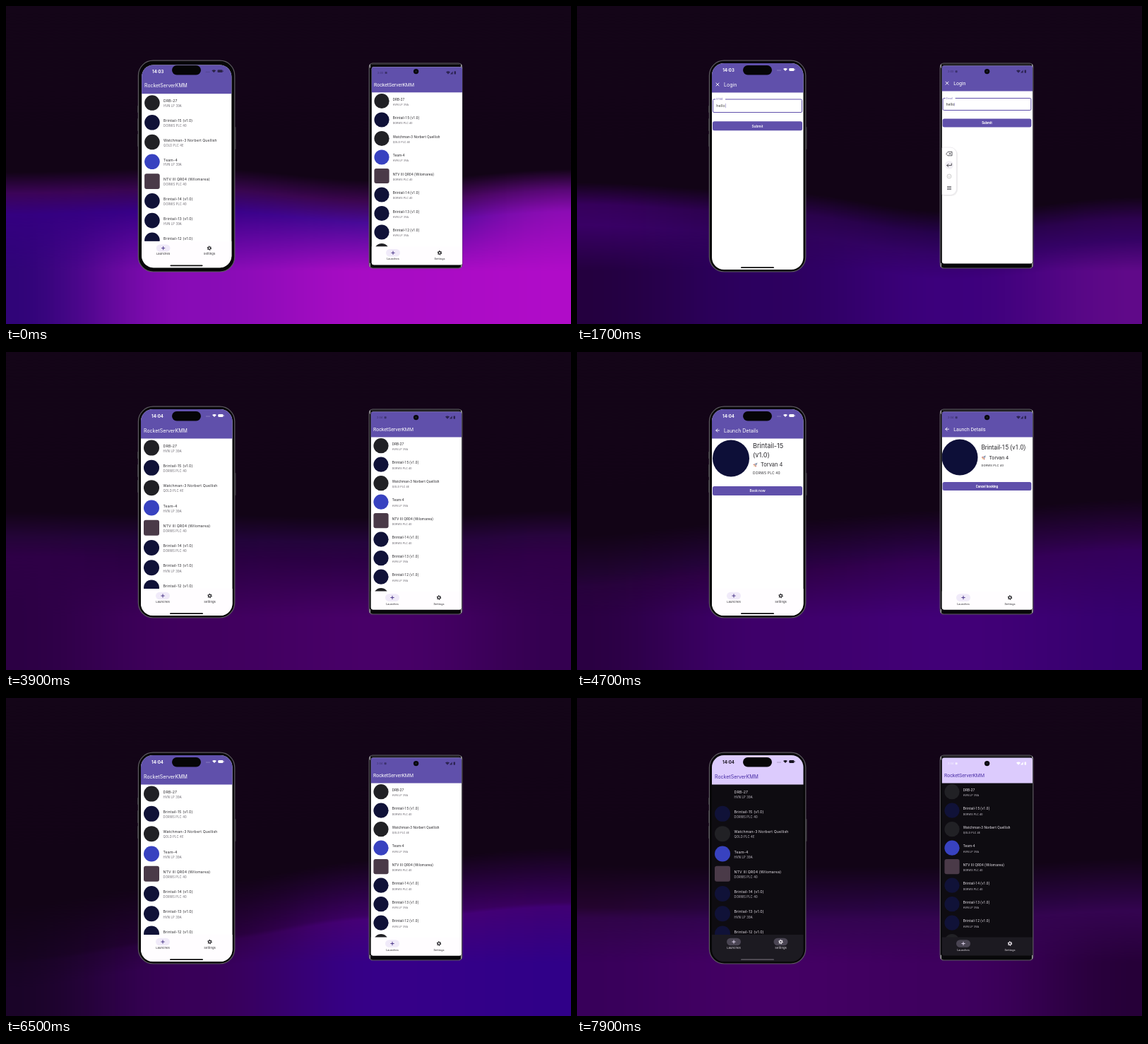
An HTML page with a canvas that plays this animation: 800x450 px, repeating every 8 s.

```html
<!DOCTYPE html>
<html lang="en">
<head>
<meta charset="utf-8">
<title>Launch app on two phones</title>
<style>
  html, body { margin: 0; width: 100%; height: 100%; overflow: hidden; background: #130417; }
  canvas, svg { position: absolute; left: 0; top: 0; width: 800px; height: 450px; }
</style>
</head>
<body>
<canvas id="sky" width="200" height="450"></canvas>
<svg id="stage" viewBox="0 0 800 450" xmlns="http://www.w3.org/2000/svg"></svg>
<script>
const LOOP = 8000, STEP = 100;
const clamp = v => Math.max(0, Math.min(1, v));
const ramp = (t, start, length) => clamp((t - start) / length);
const mix = (a, b, k) => a + (b - a) * k;

/* ---------- backdrop: a soft horizon with three colour bands below it ---------- */
const hex = s => [0, 2, 4].map(i => parseInt(s.slice(i, i + 2), 16));
const glow = (time, soft, horizon, ...bands) =>
  ({ time, soft, horizon, bands: bands.map(b => b.split(' ').map(hex)) });
const glows = [
  glow(0, 30, [250, 244, 262, 246], '3c0458 380650 3c0650 5a0878', '340080 380088 480a98 8c0cb4', '300478 880cb6 a80cc4 b00cc8'),
  glow(900, 16, [263, 268, 302, 290], '440078 3a0070 300068 340060', '440080 3c0080 40008c 3a0080', '200040 300078 4000a0 7a10b0'),
  glow(2700, 50, [268, 288, 312, 280], '240038 180420 1a0428 240438', '2c0044 1e042a 240438 2c0440', '28003e 280040 380050 400058'),
  glow(3900, 36, [244, 248, 252, 242], '240438 22043a 24043c 28043e', '2e0046 2a0042 2c0045 300048', '2c0044 40005e 480068 340050'),
  glow(5600, 78, [335, 285, 250, 228], '1c0428 280040 300050 300050', '200430 34004c 3c0064 380070', '280040 3c0078 3a0088 380090'),
  glow(6500, 78, [330, 300, 268, 250], '160420 260038 3c0064 38005c', '180424 2e0046 460078 400074', '1a0428 380058 360088 300088'),
  glow(7900, 60, [266, 268, 268, 256], '24042e 280440 2a0444 2c0444', '300448 320450 340450 340450', '38005a 440064 3e005e 260038')
];
const sky = document.getElementById('sky').getContext('2d');
const blend = (a, b, k) => a.map((v, i) => mix(v, b[i], k));
const rgb = c => `rgb(${c.map(Math.round)})`;

function drawSky(t) {
  let n = 0;
  while (n < glows.length - 2 && t >= glows[n + 1].time) n++;
  const a = glows[n], b = glows[n + 1];
  const k = ramp(t, a.time, b.time - a.time);
  const soft = mix(a.soft, b.soft, k) / 2;
  const horizon = blend(a.horizon, b.horizon, k);
  const bands = a.bands.map((band, j) => band.map((c, i) => blend(c, b.bands[j][i], k)));
  for (let x = 0; x < 200; x++) {
    const u = x / 199 * 3, i = Math.min(2, Math.floor(u));
    const f = (1 - Math.cos((u - i) * Math.PI)) / 2;
    const y = mix(horizon[i], horizon[i + 1], f);
    const g = sky.createLinearGradient(0, 0, 0, 450);
    g.addColorStop(0, '#140518');
    g.addColorStop((y - soft) / 450, '#120416');
    [y + soft, y + 45, Math.max(y + 80, 375)].forEach((stop, j) =>
      g.addColorStop(stop / 450, rgb(blend(bands[j][i], bands[j][i + 1], f))));
    sky.fillStyle = g;
    sky.fillRect(x, 0, 1, 450);
  }
}

/* ---------- drawing helpers ---------- */
const rect = (x, y, w, h, r, fill, more = '') =>
  `<rect x="${x}" y="${y}" width="${w}" height="${h}" rx="${r}" fill="${fill}" ${more}/>`;
const circle = (x, y, r, fill) => `<circle cx="${x}" cy="${y}" r="${r}" fill="${fill}"/>`;
const line = (d, color, w = 1) =>
  `<path d="${d}" fill="none" stroke="${color}" stroke-width="${w}" stroke-linecap="round" stroke-linejoin="round"/>`;
const text = (x, y, s, size, fill, more = '') =>
  `<text x="${x}" y="${y}" font-size="${size}" fill="${fill}" ${more}>${s}</text>`;
const group = (body, more) => `<g ${more}>${body}</g>`;
const at = (x, y, body) => group(body, `transform="translate(${x} ${y})"`);
const centered = 'text-anchor="middle"';

const gear = color => `<circle r="1.8" fill="none" stroke="${color}" stroke-width="1.3"/>` +
  `<circle r="2.7" fill="none" stroke="${color}" stroke-width="1.1" stroke-dasharray="1.4 1.427"/>`;
const plus = color => line('M-2.2 0H2.2M0-2.2V2.2', color, 0.9);
const rocket = s => group(
  '<path d="M0-4Q2-2 1.5 2H-1.5Q-2-2 0-4Z" fill="#b9bcc4"/><path d="M-1.5 0L-3 3L-1 2ZM1.5 0L3 3L1 2Z" fill="#c4473c"/>' +
  circle(0, -1, 0.7, '#3d6ea8') + '<path d="M-.8 2L0 4.2L.8 2Z" fill="#f0a030"/>',
  `transform="rotate(45) scale(${s})"`);

/* ---------- content ---------- */
const LIGHT = { bar: '#6050ab', onBar: '#fff', page: '#fff', nav: '#fffdff', ink: '#2b2a2e', faint: '#66636b', chip: '#f0eaf9', accent: '#3f2b80' };
const DARK = { bar: '#dccbfd', onBar: '#4a2fa6', page: '#0e0c11', nav: '#1c1a21', ink: '#e8e3ea', faint: '#cac5cf', chip: '#4a4553', accent: '#e8def8' };
const GREY = '#212125', NAVY = '#101238';
const PADS = ['HVN LP 39A', 'DORWS PLC 40', 'QOLD PLC 4E'];
const launches = [
  ['DRB-27', 0, GREY], ['Brintail-15 (v1.0)', 1, NAVY], ['Watchman-3 Norbert Quellish', 2, GREY],
  ['Team-4', 0, '#3842c0'], ['NTV III QR04 (Wilomarea)', 1, '#4a3a48'], ['Brintail-14 (v1.0)', 1, NAVY],
  ['Brintail-13 (v1.0)', 0, NAVY], ['Brintail-12 (v1.0)', 0, NAVY], ['Brintail-11 (v1.0)', 0, GREY]
];
const EMAIL = 'hello@mail.test';

const phones = [
  {
    id: 'a', font: 'Inter, sans-serif', x: 191, w: 129.5, top: 81, bottom: 373, round: 17, bar: 122.5,
    titleX: 195, titleY: 113.6, size: 7, navY: 345, navTop: 335, tabs: [222, 288.5],
    list: { icon: 206, text: 222.5, y: 135.6, step: 28.27, r: 11, size: 5.2, sub: 4.2 },
    btnX: 192, btnW: 127, btnH: 13, settingsY: 123.5, loginY: 163.3, bookY: 190,
    fieldY: 132, fieldH: 18.5, mark: 199, subTitleX: 208,
    detail: { cx: 218, cy: 150.5, x: 249, lines: ['Brintail-15', '(v1.0)'], y: 135.6, size: 9.2, rocketY: 159.2, name: 7.5, padY: 173.2, pad: 4.9 },
    snackY: 304, snackH: 16, green: 2500,
    messages: [[5200, 6200, 'Trip booked!']],
    booked: t => t >= 5100, spinBook: t => t >= 4800 && t < 5100
  },
  {
    id: 'b', font: 'Roboto, sans-serif', x: 516.8, w: 128.2, top: 84.4, bottom: 364.4, round: 3, bar: 120.5,
    titleX: 520, titleY: 111.8, size: 6.9, navY: 347.5, navTop: 338.5, tabs: [547, 613],
    list: { icon: 531, text: 546.7, y: 132.7, step: 26.5, r: 10.6, size: 4.8, sub: 3.8 },
    btnX: 517.6, btnW: 125.8, btnH: 12, settingsY: 122.2, loginY: 159.6, bookY: 184,
    fieldY: 130.5, fieldH: 17, mark: 524, subTitleX: 533.3,
    detail: { cx: 542, cy: 149, x: 572.4, lines: ['Brintail-15 (v1.0)'], y: 138.4, size: 8.6, rocketY: 149, name: 7.2, padY: 161.5, pad: 4.3 },
    snackY: 312, snackH: 15, green: 2900,
    messages: [[4800, 5400, 'Trip booked!'], [5500, 6200, 'Trip cancelled']],
    booked: t => t >= 4700 && t < 5400, spinBook: t => t >= 5200 && t < 5400
  }
];

const scenes = [
  [-900, 'list', LIGHT], [600, 'settings', LIGHT], [1200, 'login', LIGHT], [3100, 'settings', LIGHT],
  [3500, 'list', LIGHT], [4200, 'details', LIGHT], [6100, 'list', LIGHT], [7200, 'list', DARK]
];

/* ---------- screens ---------- */
function button(p, y, label, t, fill = LIGHT.bar) {
  const cx = p.btnX + p.btnW / 2, cy = y + p.btnH / 2;
  const mark = label === 'spin'
    ? at(cx, cy, group(line('M0-3.6A3.6 3.6 0 0 1 0 3.6', '#fff', 0.8), `transform="rotate(${t * 0.36 + 128})"`))
    : label === 'check' ? at(cx, cy, line('M-2 0L-.5 1.6L2.2-1.6', '#fff', 1))
    : text(cx, cy + 1.7, label, p.id === 'a' ? 4.7 : 4.5, '#fff', centered + ' font-weight="600"');
  return rect(p.btnX, y, p.btnW, p.btnH, 2.5, fill) + mark;
}

function header(p, c, title, mark) {
  const y = p.titleY - 2.6;
  const icon = mark === 'close' ? 'M-2-2L2 2M2-2L-2 2' : 'M2.4 0H-2.2M0-2.2L-2.2 0L0 2.2';
  return rect(p.x - 5, p.top - 6, p.w + 10, p.bar - p.top + 6, 0, c.bar) +
    (mark ? at(p.mark, y, line(icon, c.onBar, 0.9)) : '') +
    text(mark ? p.subTitleX : p.titleX, p.titleY, title, p.size, c.onBar);
}

function nav(p, c, active, t) {
  const chip = i => rect(p.tabs[i] - 10, p.navY - 5.3, 20, 10.6, 5.3, c.chip);
  const leaving = p.id === 'a' && t >= 7700;
  return rect(p.x - 5, p.navTop, p.w + 10, 60, 0, c.nav) + chip(active) + (leaving ? chip(1) : '') +
    at(p.tabs[0], p.navY, plus(active ? c.faint : c.accent)) + at(p.tabs[1], p.navY, gear(c.ink)) +
    ['Launches', 'Settings'].map((s, i) =>
      text(p.tabs[i], p.navY + 10, s, p.id === 'a' ? 4.1 : 3.9, c.ink, centered + ' letter-spacing=".12"')).join('');
}

const screens = {
  list(p, c, t) {
    const l = p.list;
    const rows = launches.map(([name, pad, color], i) => {
      const y = l.y + i * l.step;
      const loading = p.id === 'a' && i === 0 && t >= 7700;
      const badge = i === 4 ? rect(l.icon - l.r, y - l.r, l.r * 2, l.r * 2, 3, color) : circle(l.icon, y, l.r, color);
      return (loading ? '' : badge) +
        text(l.text, y - 0.8, name, l.size, c.ink, 'letter-spacing=".15"') +
        text(l.text, y + 6.3, PADS[pad], l.sub, c.faint, 'letter-spacing=".16"');
    }).join('');
    return rows + header(p, c, 'RocketServerKMM') + nav(p, c, 0, t);
  },

  settings(p, c, t) {
    return header(p, c, 'RocketServerKMM') +
      button(p, p.settingsY, t < 3000 ? 'Login' : 'Logout', t) + nav(p, c, 1, t);
  },

  login(p, c, t) {
    const x = p.btnX + 0.5, size = p.id === 'a' ? 5.2 : 5;
    const typed = EMAIL.slice(0, Math.floor(ramp(t, 1400, 800) * EMAIL.length));
    const base = p.fieldY + p.fieldH / 2 + 1.8;
    const state = t < 2300 ? 'Submit' : t < p.green ? 'spin' : 'check';
    const field = rect(x, p.fieldY, p.btnW - 1, p.fieldH, 1.5, '#fff', `stroke="${c.bar}" stroke-width="1"`) +
      rect(x + 3.5, p.fieldY - 1, 14, 2, 0, '#fff') +
      text(x + 4.7, p.fieldY + 1.2, 'Email', 3.7, '#7d70bb') +
      `<text x="${x + 4.7}" y="${base}" font-size="${size}" letter-spacing=".15" fill="#333">${typed}<tspan fill="#5040a8" dx="-.2">|</tspan></text>`;
    return header(p, c, 'Login', 'close') + field +
      button(p, p.loginY, state, t, state === 'check' ? '#8fd098' : c.bar) +
      (p.id === 'b' ? keyTools(ramp(t, 1300, 200)) : '');
  },

  details(p, c, t) {
    const d = p.detail;
    const label = p.spinBook(t) ? 'spin' : p.booked(t) ? 'Cancel booking' : 'Book now';
    return header(p, c, 'Launch Details', 'back') + circle(d.cx, d.cy, p.id === 'a' ? 26 : 25.5, '#0d0f38') +
      d.lines.map((s, i) => text(d.x, d.y + i * 13.2, s, d.size, c.ink)).join('') +
      at(d.x + 4, d.rocketY, rocket(0.95)) +
      text(d.x + 11, d.rocketY + 2.7, 'Torvan 4', d.name, c.ink) +
      text(d.x, d.padY, PADS[1], d.pad, c.ink, 'letter-spacing=".18"') +
      button(p, p.bookY, label, t) + p.messages.map(m => snackbar(p, t, m)).join('') + nav(p, c, 0, t);
  }
};

function snackbar(p, t, [from, to, message]) {
  const shown = Math.min(ramp(t, from - 100, 200), 1 - ramp(t, to - 100, 100));
  if (!shown) return '';
  const x = p.btnX + 1.8, y = p.snackY;
  const size = p.id === 'a' ? 4.6 : 4.4;
  return group(rect(x, y, p.btnW - 4, p.snackH, 1.5, '#262529') +
    text(x + 5, y + p.snackH / 2 + 1.6, message, size, '#eee', 'letter-spacing=".08"') +
    (message.endsWith('!') ? at(x + 36.5, y + p.snackH / 2, rocket(0.55)) : ''), `opacity="${shown}"`);
}

function keyTools(shown) {
  const ink = '#3c3b42';
  return group(rect(512, 201, 27, 68, 9, '#0001') + rect(511, 200, 26.5, 67.5, 9, '#fff', 'stroke="#e2dfe6" stroke-width=".6"') +
    at(527, 209, line('M-4 0L-1.7-2.8H4V2.8H-1.7ZM0-1.2L2.4 1.2M2.4-1.2L0 1.2', ink, 0.8)) +
    circle(527, 225, 6, '#f2f0f5') + at(527, 225, line('M3.3-2V.6H-3.2M-1.2-1.4L-3.2.6L-1.2 2.6', ink, 0.9)) +
    at(527, 241, '<circle r="3" fill="none" stroke="#bbb" stroke-width=".7"/>' + line('M-1.3.6Q0 2 1.3.6M-1-1V-.8M1-1V-.8', '#bbb', 0.6)) +
    at(527, 257.5, line('M-2.6-2H2.6M-2.6 0H2.6M-2.6 2H2.6', ink, 0.8)), `opacity="${shown}"`);
}

/* ---------- phone bodies and status bars ---------- */
const wifi = (x, y, color) => at(x, y, `<path d="M0 2.1L-3-1Q0-3.2 3-1Z" fill="${color}"/>`);

function body(p) {
  if (p.id === 'a') return [[186, 141, 10], [186, 159, 18], [186, 181, 18], [324, 171, 32]]
    .map(([x, y, h]) => rect(x, y, 1.6, h, 0.8, '#343138')).join('') +
    rect(187.4, 77.2, 136.4, 298.8, 21, '#070708', 'stroke="#5d5a60" stroke-width="1.2"');
  return rect(514.2, 81, 131.6, 290, 5, '#08080a', 'stroke="#5d5a60" stroke-width="1.2"') +
    line('M515.4 87V83.4M644.6 87V83.4M515.4 364V368.6M644.6 364V368.6', '#a5a3a8', 1.2) +
    line('M518 82.4H642', '#47454a', 0.8);
}

function island(p) {
  return p.id === 'a' ? rect(235, 84, 41, 13.4, 6.7, '#050506')
    : circle(580.6, 92.6, 3.7, '#08080b') + circle(580.6, 92.6, 1.2, '#1d2036');
}

function status(p, c, t) {
  if (p.id === 'a') {
    const ink = c === DARK ? '#17121f' : '#fff', right = t < 200 ? '#2b2348' : ink;
    return text(214.5, 92.6, t < 3200 ? '14:03' : '14:04', 6, ink, centered + ' font-weight="700"') +
      [284, 286, 288].map(x => circle(x, 91, 0.45, right)).join('') + wifi(295, 90, right) +
      rect(300.3, 88, 7.2, 3.9, 1.2, right) + rect(307.9, 89.2, 0.7, 1.5, 0.3, right) +
      rect(232, 369.2, 47, 1.9, 0.95, c === DARK ? '#55515a' : '#111');
  }
  const ink = c === DARK ? '#fff' : '#2c2452';
  return text(525, 94.4, t < 3200 ? '2:03' : '2:04', 4.3, ink, 'opacity=".7"') + rect(535.6, 91.2, 3, 3, 0.6, ink, 'opacity=".7"') +
    wifi(625, 92.6, ink) + `<path d="M628 94.6L631.6 90.6V94.6Z" fill="${ink}"/>` + rect(633.6, 90.4, 2.4, 4.3, 0.6, ink);
}

function drawPhone(p, t) {
  let n = scenes.length - 1;
  while (t < scenes[n][0]) n--;
  const paint = ([, name, c]) => rect(p.x - 5, p.top - 5, p.w + 10, 310, 0, c.page) + screens[name](p, c, t);
  const shown = ramp(t, scenes[n][0], 200);
  const layers = (shown < 1 ? paint(scenes[n - 1]) : '') + group(paint(scenes[n]), `opacity="${shown}"`);
  const settle = 1 - ramp(t, 0, 300);
  const shift = p.id === 'a'
    ? `translate(256 215) scale(${1 - 0.018 * settle}) translate(-256 -215)`
    : `translate(${settle} ${1.8 * settle})`;
  const screen = group(layers + status(p, scenes[n][2], t), `clip-path="url(#${p.id})" font-family="${p.font}"`);
  return body(p) +
    `<clipPath id="${p.id}">${rect(p.x, p.top, p.w, p.bottom - p.top, p.round, '#fff')}</clipPath>` +
    group(screen, `transform="${shift}"`) + island(p);
}

const stage = document.getElementById('stage');
const began = performance.now();
let last = -1;
function frame(now) {
  const t = Math.floor((Math.max(0, now - began) % LOOP) / STEP) * STEP;
  if (t !== last) {
    last = t;
    drawSky(t);
    stage.innerHTML = phones.map(p => drawPhone(p, t)).join('');
  }
  requestAnimationFrame(frame);
}
frame(began);
</script>
</body>
</html>
```
